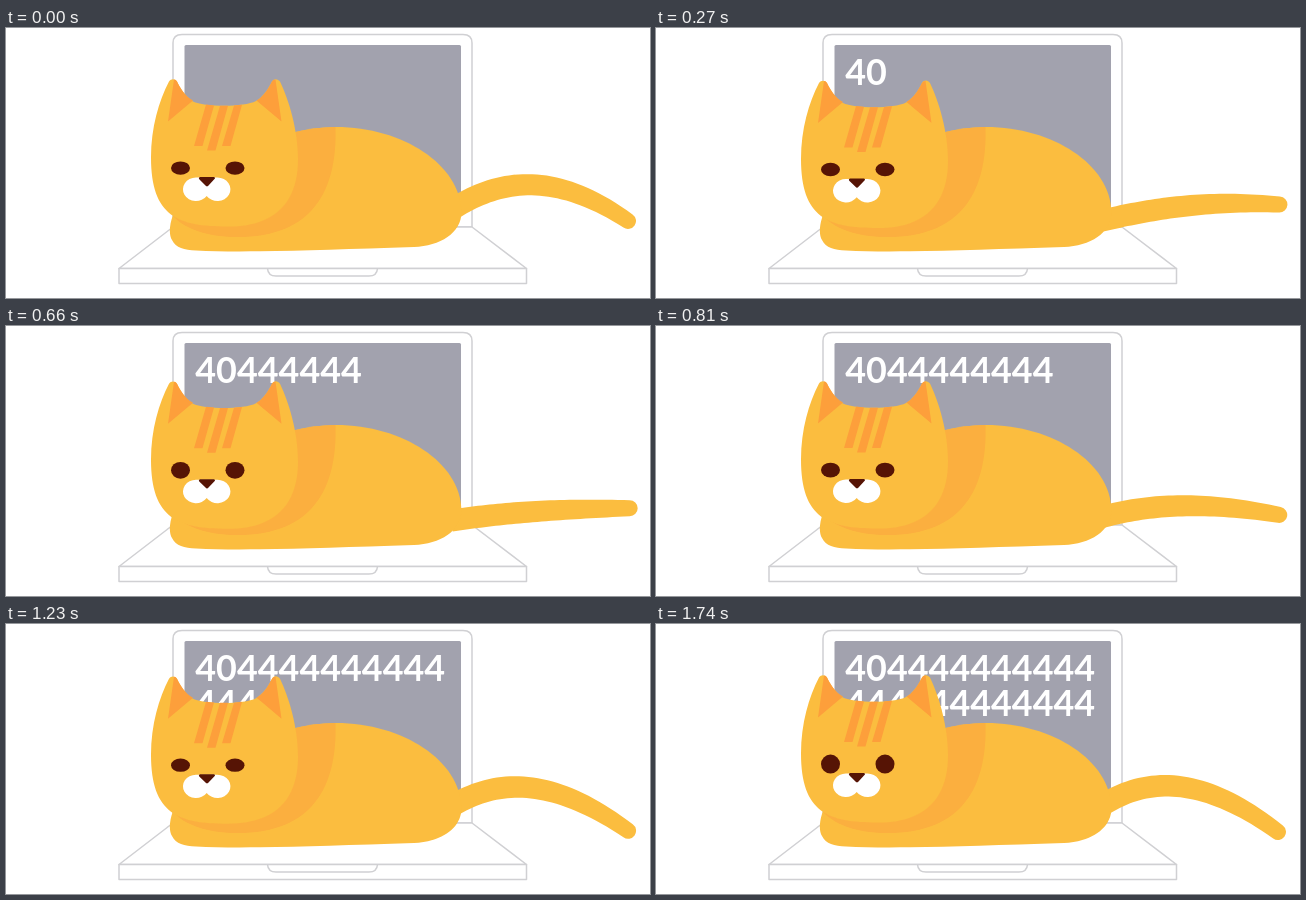
These frames come from a looping animation (644 px wide and 270 px high, 1800 ms). An HTML page:

```html
<!DOCTYPE html>
<html>
<head>
<meta charset="utf-8">
<style>
  html, body { margin: 0; width: 100%; height: 100%; overflow: hidden; background: #fff; }
  svg { display: block; }
  text { font: 700 35.9px Lato, sans-serif; fill: #fff; }
  .line { fill: #fff; stroke: #d0d0d3; stroke-width: 1.5; stroke-linejoin: round; }
  .fur { fill: #fbbd3f; }
  .shade { fill: #fbaf3f; }
  .mark { fill: #fd9f3b; }
  .dark { fill: #561405; }
</style>
</head>
<body>
<svg width="644" height="270" viewBox="0 0 644 270">
  <g class="line">
    <path d="M167 199V15Q167 6.500 176 6.500H457Q466 6.500 466 15V199Z"/>
    <path d="M167 199H466L520.500 240.500H113Z"/>
    <path d="M113 240.500H520.500V255.500H113Z"/>
    <path fill="none" d="M261.500 240.500Q262 248 270 248H363Q371 248 371.500 240.500"/>
  </g>
  <rect x="178.500" y="17" width="276.500" height="171" rx="1.500" fill="#a2a2ae"/>
  <text id="row0" x="189.300" y="57"></text>
  <text id="row1" x="189.300" y="92"></text>

  <path id="tail" class="fur"/>
  <path class="fur" d="M167 187C163 198 163 207 166 212C170 220 178 222 190 222.500C240 225 310 222 408 219
    C434 218 455.500 205 455.500 184C455 137 397 99 330 99Q308 99 285 105L200 150Z"/>
  <path class="shade" d="M329.500 99C331 150 316 209 232 209C203 209 180 202 167 188L200 130L285 105Q308 99 329.500 99Z"/>

  <g id="head">
    <path class="fur" d="M163 54C165 51 169 51 171 54C174 60 179 69 187 74C198 79.500 238 80 250 73.500
      C258 69 263 60 266 54C268 50.500 272 51 274 54C283 73 292 102 292 132C292 172 272 199 222 199
      C172 199 145 189 145 130C145 100 153 73 163 54Z"/>
    <path class="mark" d="M168 52Q170 52 171 54C174 60 179 69 187 73L162 94Z"/>
    <path class="mark" d="M269.500 52Q267 52 266 54C263 60 258 69 250.500 73L275.500 94Z"/>
    <path class="mark" d="M200 77L208 77.800L196.500 118.500H188ZM214 78.200H222L209.500 123H201ZM228 78L236 77.200L224.500 118.500H216Z"/>
    <path fill="#fff" d="M190 150H211.400A13 11.700 0 1 1 200.700 168.300A13 11.700 0 1 1 190 150Z"/>
    <path class="dark" d="M194 149.500H208Q210 150.500 208 152L202.500 157.800Q201 159.500 199.500 157.800L193.500 152Q192 150.500 194 149.500Z"/>
    <ellipse class="dark eye" cx="174.500" cy="140.500" rx="9.500"/>
    <ellipse class="dark eye" cx="229" cy="140.500" rx="9.500"/>
  </g>
</svg>
<script>
const LOOP = 1800, STEP = 30, LAST = 1740, PER_ROW = 12;
const message = "40" + "4".repeat(22);
const $ = id => document.getElementById(id);
const eyes = document.querySelectorAll(".eye");

// Control points of the tail's centre line, raised and lowered
const raised = [[445, 182], [490, 153], [545, 150], [622, 208]];
const lowered = [[445, 197], [490, 194], [545, 189], [624, 177.5]];

const mix = (a, b, k) => a + (b - a) * k;

function ease(from, to, t) {
  const u = Math.max(0, Math.min(1, (t - from) / (to - from)));
  return (1 - Math.cos(Math.PI * u)) / 2;
}

// Rises from 0 to 1 at the peak and sinks back
const swell = (from, peak, to, t) => ease(from, peak, t) - ease(peak, to, t);

function bezier(p, u) {
  const v = 1 - u;
  return [0, 1].map(i => v ** 3 * p[0][i] + 3 * v * v * u * p[1][i]
    + 3 * v * u * u * p[2][i] + u ** 3 * p[3][i]);
}

function tailPath(t) {
  const low = swell(0, 420, 1350, t);
  const curl = Math.max(0, 1 - (t / 450) ** 2); // the tip runs ahead of the base
  const p = raised.map((a, i) => a.map((v, axis) => mix(v, lowered[i][axis], low)));
  p[2][1] -= 10 * curl;
  p[3][1] -= 15 * curl;

  const top = [], bottom = [], n = 40;
  let r;
  for (let k = 0; k <= n; k++) {
    const u = k / n, [x, y] = bezier(p, u);
    const [x0, y0] = bezier(p, u - 0.01), [x1, y1] = bezier(p, u + 0.01);
    const angle = Math.atan2(y1 - y0, x1 - x0);
    r = 11 - 3 * u ** 3;
    const dx = r * Math.sin(angle), dy = r * Math.cos(angle);
    top.push([x + dx, y - dy]);
    bottom.unshift([x - dx, y + dy]);
  }
  return `M${top.join("L")}A${r} ${r} 0 0 1 ${bottom.join("L")}Z`;
}

function draw(now) {
  const t = Math.min(LAST, Math.floor(now % LOOP / STEP) * STEP);
  const count = Math.floor(message.length * (t / LAST) ** 1.132);
  const drop = mix(-0.4, 3.8, swell(0, 690, 1500, t));
  const open = 6.7 + 2 * swell(270, 540, 1000, t) + 2.8 * ease(1620, LAST, t);

  $("row0").textContent = message.slice(0, Math.min(count, PER_ROW));
  $("row1").textContent = message.slice(PER_ROW, Math.max(count, PER_ROW));
  $("tail").setAttribute("d", tailPath(t));
  $("head").setAttribute("transform", `translate(0 ${drop})`);
  eyes.forEach(eye => eye.setAttribute("ry", open));
}

const start = performance.now();
function frame() {
  draw(performance.now() - start);
  requestAnimationFrame(frame);
}
frame();
</script>
</body>
</html>
```
